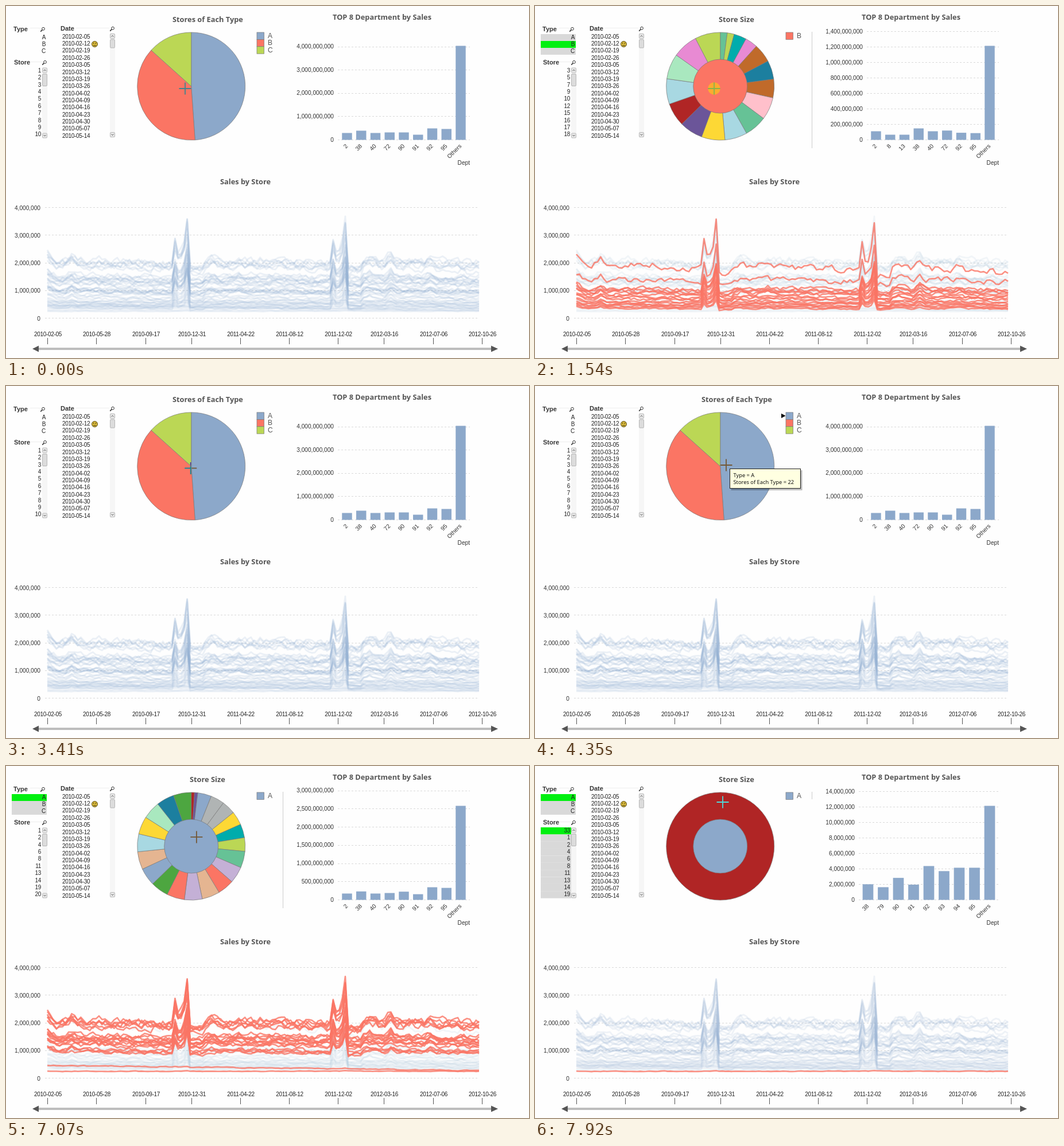
An HTML page that plays this animation: 911 by 614 pixels, repeating every 8 s.

```html
<!DOCTYPE html>
<html lang="en">
<head>
<meta charset="utf-8">
<title>Store sales dashboard</title>
<style>
  html, body { margin: 0; width: 100%; height: 100%; overflow: hidden; background: #fefefe; }
  svg { display: block; width: 100%; height: 100%; font-family: "Liberation Sans", Arial, sans-serif; }
  .title { font: bold 12.8px "Open Sans", "Noto Sans", sans-serif; fill: #555; }
  .head { font-size: 11px; font-weight: bold; fill: #333; }
  .item { font-size: 10px; letter-spacing: -.3px; fill: #222; }
  .axis { font-size: 10.15px; fill: #333; }
  .legend { font-size: 12px; fill: #555; }
  .tip { font: 9.3px "Noto Sans", sans-serif; fill: #111; }
  .grid { stroke: #d9d9d9; stroke-dasharray: 3 3; }
  .slice { stroke: #777; stroke-width: .7; }
  .lines { fill: none; stroke-linejoin: round; }
  #cross { mix-blend-mode: difference; }
</style>
</head>
<body>
<svg id="stage" viewBox="0 0 911 614"></svg>
<script>
const DURATION = 8000;
const stage = document.getElementById('stage');
const BLUE = '#8ca8ca', CORAL = '#fb7564', LIME = '#bbd755';
const GREEN = '#00f010', GREY = '#d9d9d9';

function add(parent, tag, attrs = {}, text) {
  const node = document.createElementNS('http://www.w3.org/2000/svg', tag);
  for (const key in attrs) node.setAttribute(key, attrs[key]);
  if (text !== undefined) node.textContent = text;
  parent.appendChild(node);
  return node;
}
const group = (parent, attrs) => add(parent, 'g', attrs);
const rect = (parent, x, y, width, height, fill, more) =>
  add(parent, 'rect', { x, y, width, height, fill, ...more });
const path = (parent, d, attrs) => add(parent, 'path', { d, ...attrs });
const label = (parent, x, y, cls, text, anchor = 'start', more) =>
  add(parent, 'text', { x, y, class: cls, 'text-anchor': anchor, ...more }, text);
const gridLine = (parent, x1, x2, y) => path(parent, `M${x1} ${y}H${x2}`, { class: 'grid' });
const money = value => value.toLocaleString('en-US');
const weekDate = week => new Date(Date.UTC(2010, 1, 5 + 7 * week)).toISOString().slice(0, 10);

function random(seed) {
  return () => {
    seed = (seed + 0x6D2B79F5) | 0;
    let r = Math.imul(seed ^ (seed >>> 15), 1 | seed);
    r = (r + Math.imul(r ^ (r >>> 7), 61 | r)) ^ r;
    return ((r ^ (r >>> 14)) >>> 0) / 4294967296;
  };
}

// Linear interpolation through a few [x, y] points.
function through(points, x) {
  const i = Math.max(1, points.findIndex(p => p[0] >= x));
  const [x0, y0] = points[i - 1], [x1, y1] = points[i];
  return y0 + (y1 - y0) * (x - x0) / (x1 - x0);
}

// ---- Store sales ----
const LAST_WEEK = 142;
const bump = (week, centre, height, width) => height * Math.max(0, 1 - Math.abs(week - centre) / width);

function season(week) {
  const w = week % 52;
  if (w === 42) return 1.42;
  if (w > 42 && w <= 46) return 1.14 + .65 * ((w - 43) / 3) ** 3;
  if (w > 46) return .89;
  return .98 + .025 * Math.sin((w - 2) / 52 * 2 * Math.PI)
    + bump(week, 0, .2, 3) + bump(week, 8, .12, 2) + bump(week, 54, .07, 3) + bump(week, 63, .06, 2)
    + bump(week, 106, .1, 4) + bump(week, 113, .17, 2) + bump(week, 126, .06, 2);
}

function salesPath(seed, band, mean) {
  const rnd = random(seed * 977);
  const spread = band.flat ? .06 : band.type === 'B' ? 1.1 + rnd() * .1 : .6 + rnd() * .4;
  const wobble = band.flat ? .08 : .13;
  let drift = 0, d = '';
  for (let week = 0; week <= LAST_WEEK; week++) {
    drift = drift * .4 + (rnd() - .5) * wobble;
    const trend = 1 + (band.trend ?? 0) * (.5 - week / LAST_WEEK);
    const sales = mean * (trend + (season(week) - 1) * spread + drift);
    d += `${week ? 'L' : 'M'}${(72 + week * 5.296).toFixed(1)} ${(545 - sales * 48.2).toFixed(1)}`;
  }
  return d;
}

// Stores spread evenly over bands of mean weekly sales, in millions.
const BANDS = [
  { type: 'A', count: 6, low: 1.88, high: 2.11 },
  { type: 'A', count: 10, low: 1.2, high: 1.56 },
  { type: 'A', count: 4, low: .95, high: 1.04 },
  { type: 'A', count: 1, low: .38, flat: true, trend: .5 },
  { type: 'A', count: 1, low: .26, flat: true, smallest: true },
  { type: 'B', count: 1, low: 1.87, trend: .12 },
  { type: 'B', count: 1, low: 1.39 },
  { type: 'B', count: 5, low: .89, high: 1.08 },
  { type: 'B', count: 3, low: .71, high: .79 },
  { type: 'B', count: 7, low: .36, high: .62 },
  { type: 'C', count: 6, low: .3, high: .63, flat: true }
];
const series = [];
for (const band of BANDS) {
  for (let i = 0; i < band.count; i++) {
    const mean = band.low + (band.count > 1 ? (band.high - band.low) * i / (band.count - 1) : 0);
    series.push({ band, d: salesPath(series.length + 1, band, mean) });
  }
}

// ---- Views ----
const HUES = { b: BLUE, c: CORAL, l: LIME, g: '#66c296', t: '#00acac', p: '#e88ad3', o: '#c06a2a', s: '#1c7f9f',
  k: '#ffc0cb', a: '#a8d8e2', y: '#fdd835', u: '#6b5599', r: '#b02525', m: '#a9e8bf', e: '#b0b4b4', v: '#c4b0d6',
  n: '#e5b591', f: '#4da640' };
const TYPE_HUE = { A: BLUE, B: CORAL, C: LIME };

// Typical department bar heights; each view leans towards goods or food (90 and up).
const DEPARTMENTS = { 2: 12, 8: 7.2, 13: 7.2, 38: 16, 40: 12, 72: 13, 79: 13, 90: 13, 91: 9, 92: 20, 93: 17, 94: 19, 95: 19 };

const VIEWS = {
  all: {
    stores: '1 2 3 4 5 6 7 8 9 10', selected: () => false, faint: .16,
    bars: { left: 578, top: 70.5, max: 4, step: 1, unit: 1e9, names: '2 38 40 72 90 91 92 95', goods: 1, food: 1 }
  },
  B: {
    type: 'B', stores: '3 5 7 9 10 12 15 16 17 18', selected: band => band.type === 'B', faint: .11,
    hues: 'gltposokgayurampl',
    turn: [[0, 0], [2, 15], [4, 42], [7, 102.5], [10, 175], [13, 250.7], [17, 360]],
    bars: { left: 578, top: 44, max: 14, step: 2, unit: 1e8, names: '2 8 13 38 40 72 92 95', goods: 1.25, food: .62 }
  },
  A: {
    type: 'A', stores: '1 2 4 6 8 11 13 14 19 20', selected: band => band.type === 'A', faint: .11,
    hues: 'rubeeytlgvcnvcfbnaymsf',
    turn: [[0, 0], [2, 7], [8, 95.5], [11, 149], [22, 360]],
    bars: { left: 578, top: 42.5, max: 30, step: 5, unit: 1e8, names: '2 38 40 72 90 91 92 95', goods: .92, food: 1.1 }
  },
  one: {
    type: 'A', store: '33', stores: '33 1 2 4 6 8 11 13 14 19', selected: band => band.smallest, faint: .14,
    hues: 'r', turn: [[0, 0], [1, 360]],
    bars: { left: 564, top: 44, max: 14, step: 2, unit: 1e6, names: '38 79 90 91 92 93 94 95', goods: 1.7, food: 2.95 }
  }
};

// ---- Fixed parts ----
function searchIcon(x, y) {
  add(stage, 'circle', { cx: x + 1, cy: y - 1.2, r: 2.4, fill: '#fff', stroke: '#333' });
  path(stage, `M${x - .8} ${y + .6}L${x - 3.8} ${y + 3.6}`, { stroke: '#333', 'stroke-width': 1.5 });
}
function scrollbar(x, top, bottom, thumbTop, thumbHeight) {
  rect(stage, x, top, 9, bottom - top, '#f6f6f6');
  const box = { stroke: '#aaa', 'stroke-width': .8, rx: 1.5 };
  [[top, 1], [bottom - 9, -1]].forEach(([y, dir]) => {
    rect(stage, x + .5, y + .5, 8, 8, '#e8e8e8', box);
    path(stage, `M${x + 2.5} ${y + 4.5 + dir}l2 ${-2 * dir}l2 ${2 * dir}`, { fill: 'none', stroke: '#444' });
  });
  rect(stage, x + .5, thumbTop, 8, thumbHeight, '#dcdcdc', box);
}
function drawFrame() {
  rect(stage, 0, 0, 911, 614, '#fefefe');
  path(stage, 'M42 38.5H59M122 38.5H180M43 97.5H62M182.5 42V230', { stroke: '#eee' });
  label(stage, 13, 44, 'head', 'Type');
  label(stage, 14, 102, 'head', 'Store');
  label(stage, 95, 43, 'head', 'Date');
  searchIcon(64, 41);
  searchIcon(67, 99);
  searchIcon(185, 40);
  for (let i = 0; i < 15; i++) label(stage, 98, 56.7 + i * 12.36, 'item', weekDate(i));
  add(stage, 'circle', { cx: 154.5, cy: 66.5, r: 5, fill: '#d9b93a', stroke: '#514516' });
  path(stage, 'M152.7 64v2M156.3 64v2M152 69h5', { stroke: '#3a3210' });
  scrollbar(181, 48, 229, 58.5, 14.5);

  label(stage, 569, 24, 'title', 'TOP 8 Department by Sales');
  label(stage, 373, 311, 'title', 'Sales by Store');
  label(stage, 808, 276.5, 'axis', 'Dept', 'end');
  for (let i = 0; i <= 4; i++) {
    const y = 545 - i * 48.2;
    label(stage, 60, y + 3.5, 'axis', money(i * 1e6), 'end');
    gridLine(stage, 68, 824, Math.round(y) - .5);
  }
  for (let i = 0; i <= 9; i++) {
    const week = Math.round(LAST_WEEK * i / 9);
    const x = Math.round(73 + week * 5.33);
    label(stage, x, 576, 'item', weekDate(week), 'middle');
    path(stage, `M${x - .5} 579V590`, { stroke: '#555' });
  }
  rect(stage, 57, 596, 788, 4, '#bdbdbd');
  path(stage, 'M46 598L57 592.5V603.5ZM857 598L845 592.5V603.5Z', { fill: '#555' });
}

// ---- View parts ----
function drawLists(g, view) {
  ['A', 'B', 'C'].forEach((type, i) => {
    if (view.type) rect(g, 10, 49 + i * 12, 61, 12, type === view.type ? GREEN : GREY);
    label(g, 69, 57.5 + i * 12.36, 'item', type, 'end');
  });
  view.stores.split(' ').forEach((id, i) => {
    if (view.store) rect(g, 10, 107 + i * 12.36, 53, 12.4, id === view.store ? GREEN : GREY);
    label(g, 61, 116 + i * 12.36, 'item', id, 'end');
  });
}

const CX = 322.7, CY = 140, R = 94;
function drawSlices(g, ends, colors) {
  const at = deg => {
    const a = deg * Math.PI / 180;
    return `${CX + R * Math.sin(a)} ${CY - R * Math.cos(a)}`;
  };
  let start = 0;
  ends.forEach((end, i) => {
    if (end - start === 360) add(g, 'circle', { cx: CX, cy: CY, r: R, fill: colors[i], class: 'slice' });
    else path(g, `M${CX} ${CY}L${at(start)}A${R} ${R} 0 ${end - start > 180 ? 1 : 0} 1 ${at(end)}Z`,
      { fill: colors[i], class: 'slice' });
    start = end;
  });
}
function drawPie(g, view) {
  if (view.type) {
    const colors = [...view.hues].map(h => HUES[h]);
    label(g, 320, 28, 'title', 'Store Size');
    drawSlices(g, colors.map((_, i) => through(view.turn, i + 1)), colors);
    add(g, 'circle', { cx: CX, cy: CY, r: 47, fill: TYPE_HUE[view.type], class: 'slice' });
    path(g, `M482.5 45V${view.store ? 58 : 248}`, { stroke: '#ccc' });
  } else {
    label(g, 290, 28, 'title', 'Stores of Each Type');
    drawSlices(g, [176, 312, 360], Object.values(TYPE_HUE));
  }
  const types = view.type ? [view.type] : Object.keys(TYPE_HUE);
  types.forEach((type, i) => {
    rect(g, 437, 46 + i * 12.4, 12.5, 12.4, TYPE_HUE[type], { class: 'slice' });
    label(g, 456, 55.8 + i * 12.4, 'legend', type);
  });
}

function drawBars(g, { bars }) {
  const { left, top, max, step, unit } = bars;
  for (let v = 0; v <= max; v += step) {
    const y = 233 - (233 - top) * v / max;
    gridLine(g, left, 808, Math.round(y) + .5);
    label(g, left - 7, y + 3.6, 'axis', money(v * unit), 'end');
  }
  const gap = (776 - left) / 8, width = gap * .705;
  [...bars.names.split(' '), 'Others'].forEach((name, i) => {
    const x = left + 16 + i * gap;
    const height = name === 'Others' ? 164 : DEPARTMENTS[name] * (name >= 90 ? bars.food : bars.goods);
    rect(g, x - width / 2, 233.5 - height, width, height, BLUE);
    label(g, 0, 0, 'axis', name, 'end', { transform: `translate(${x + 2} 245) rotate(-45)` });
  });
}

function drawLines(g, view) {
  const muted = group(g, { class: 'lines', stroke: BLUE, 'stroke-width': 2.8, 'stroke-opacity': view.faint });
  const bright = group(g, { class: 'lines', stroke: CORAL, 'stroke-width': 2.6, 'stroke-opacity': .8 });
  series.forEach(s => path(view.selected(s.band) ? bright : muted, s.d));
}

drawFrame();
const PARTS = { lists: drawLists, pie: drawPie, bars: drawBars, lines: drawLines };
const layers = {};
for (const part in PARTS) {
  layers[part] = {};
  for (const name in VIEWS) PARTS[part](layers[part][name] = group(stage), VIEWS[name]);
}
scrollbar(63, 107.5, 230.5, 118.5, 21);

const cross = group(stage, { id: 'cross' });
path(cross, 'M-10.5 0H10.5M0 -10.5V10.5', { stroke: '#fff', 'stroke-width': 1.8 });
const click = add(stage, 'circle', { r: 10.7, fill: '#ffdc00', 'fill-opacity': .52 });

const tooltip = group(stage);
rect(tooltip, 341.5, 147, 124, 35, '#000', { opacity: .25 });
rect(tooltip, 339.5, 144.5, 123, 34, '#ffffe1', { stroke: '#222' });
label(tooltip, 345.5, 158.6, 'tip', 'Type = A');
label(tooltip, 345.5, 170.6, 'tip', 'Stores of Each Type = 22');
path(tooltip, 'M429 48L436.5 52L429 56Z', { fill: '#000' });

// ---- Timeline ----
// Each view change repaints the parts one after another.
const CHANGES = [
  { view: 'all', start: 0, delay: 0 },
  { view: 'B', start: 150, delay: 75 },
  { view: 'all', start: 1620, delay: 50 },
  { view: 'A', start: 4430, delay: 75 },
  { view: 'one', start: 7850, delay: 23 }
];
const MOVES = [
  { start: 3410, end: 3480, steps: 2, x: 328, y: 143 },
  { start: 3650, end: 3800, steps: 3, x: 333, y: 138 },
  { start: 7070, end: 7530, steps: 7, x: 327, y: 63 }
];

function pointer(t) {
  let x = 312, y = 144;
  for (const m of MOVES) {
    if (t < m.start) break;
    const step = Math.floor((t - m.start) / (m.end - m.start) * (m.steps - 1) + 1e-6) + 1;
    const eased = 1 - (1 - Math.min(1, step / m.steps)) ** 1.35;
    x += (m.x - x) * eased;
    y += (m.y - y) * eased;
  }
  return `translate(${x} ${y})`;
}
const within = (t, from, to) => t >= from && t < to;
const show = (node, on) => node.setAttribute('display', on ? 'inline' : 'none');

function render(t) {
  Object.keys(PARTS).forEach((part, order) => {
    const active = CHANGES.findLast(c => t >= c.start + c.delay * order).view;
    for (const name in VIEWS) show(layers[part][name], name === active);
  });
  const place = pointer(t);
  cross.setAttribute('transform', place);
  cross.setAttribute('opacity', t < 70 ? .75 : 1);
  click.setAttribute('transform', place);
  show(click, within(t, 1540, 1620) || within(t, 7680, 7850));
  show(tooltip, within(t, 4350, 4505));
}

let origin;
function tick(now) {
  origin ??= now;
  render((now - origin) % DURATION);
  requestAnimationFrame(tick);
}
render(0);
requestAnimationFrame(tick);
</script>
</body>
</html>
```
